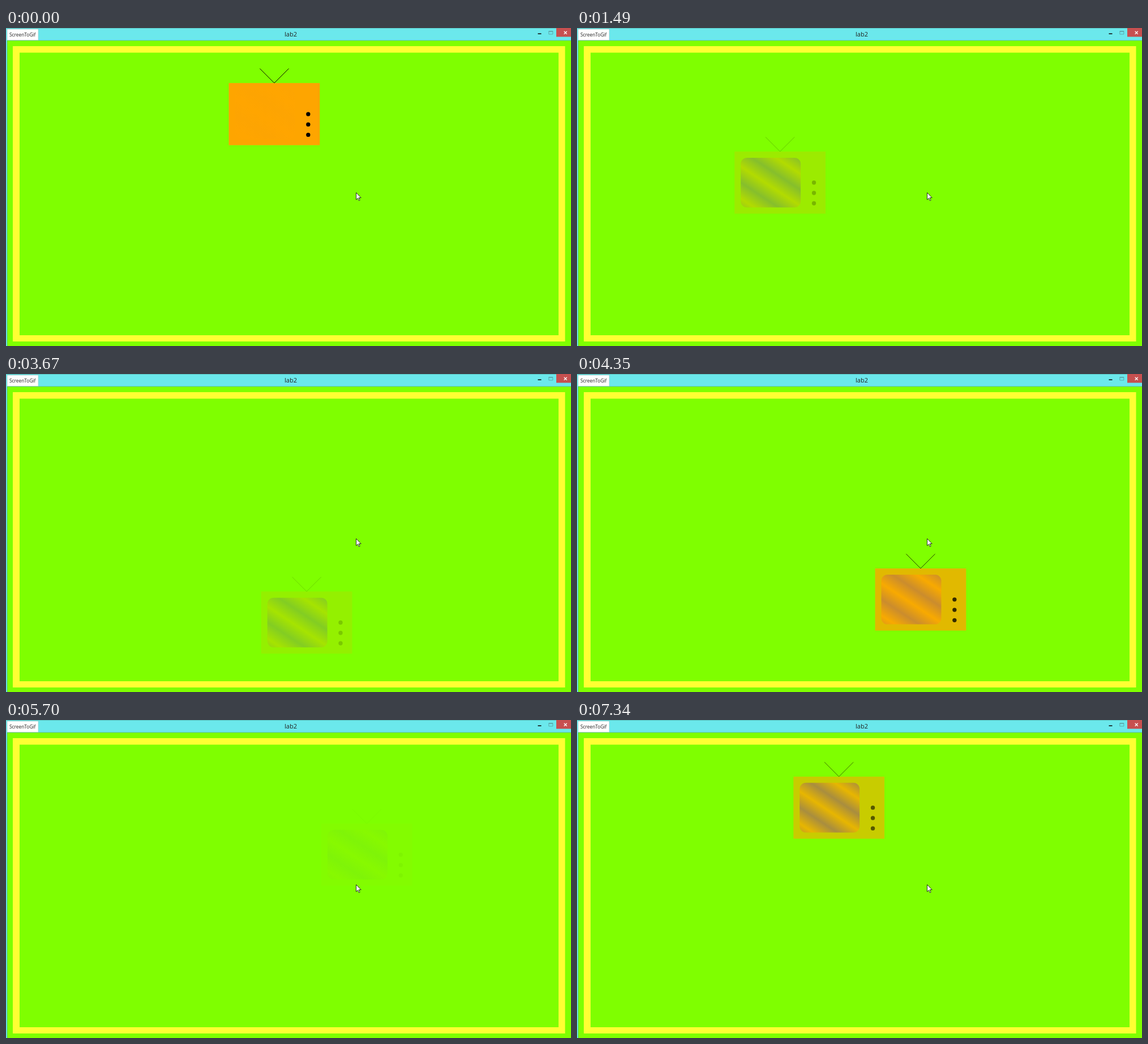
An HTML page that plays this animation: 998x561 px, repeating every 7.41 s.

```html
<!DOCTYPE html>
<html>
<head>
<meta charset="utf-8">
<style>
  html, body { margin: 0; width: 100%; height: 100%; overflow: hidden; background: #7fff00; }
  svg { display: block; }
  text { font-family: "Open Sans", "Noto Sans", sans-serif; text-anchor: middle; fill: #222; }
  #tv > * { opacity: var(--a); }
</style>
</head>
<body>
<svg width="998" height="561" viewBox="0 0 998 561">
  <defs>
    <linearGradient id="stripes" gradientUnits="userSpaceOnUse" spreadMethod="reflect"
                    x1="-95" y1="-2.8" x2="-112.8" y2="24.1">
      <stop id="dark" offset="0"/>
      <stop offset="1" stop-color="orange"/>
    </linearGradient>
  </defs>

  <!-- window -->
  <rect width="998" height="561" fill="#6be8ec"/>
  <rect x="2" y="22" width="996" height="539" fill="#7fff00"/>
  <path d="M0 .4H998M2 22H998M2 22V561" stroke="#4fa9a0" stroke-width=".7" fill="none"/>
  <path d="M12 32H987.5V553H12ZM24 43.5V542H976V43.5Z" fill="#ffff33"/>
  <rect x="2" y="2" width="55" height="19.5" fill="#fff" stroke="#a5c8ca" stroke-width=".7"/>
  <text x="29.2" y="15.2" font-size="8.4">ScreenToGif</text>
  <text x="503" y="15.3" font-size="11">lab2</text>
  <path d="M939.5 10.2H945.5" stroke="#111" stroke-width="1.6"/>
  <path d="M958.8 5.5H965.8V11H958.8ZM958.8 6.3H965.8" fill="none" stroke="#5a9a9c" stroke-width=".8"/>
  <rect x="972" width="26" height="15.5" fill="#c75050"/>
  <path d="M985.7 5.7l5 5m0-5l-5 5" stroke="#fff" stroke-width="1.3"/>

  <g id="tv">
    <path d="M-35-35L0 0L35-35" fill="none" stroke="#000" stroke-width="1.3"/>
    <rect x="-110" width="220" height="150" fill="orange"/>
    <rect x="-95" y="15" width="145" height="120" rx="15" fill="url(#stripes)"/>
    <circle cx="82" cy="75" r="5"/>
    <circle cx="82" cy="100" r="5"/>
    <circle cx="82" cy="125" r="5"/>
  </g>

  <path d="M618.5 290.5v12.4l2.9-2.7 1.9 4.3 1.8-.8-1.9-4.2h3.9z" fill="#fff" stroke="#000" stroke-width=".8"/>
</svg>
<script>
const LOOP = 7410, FIRST = 107;
const CENTER = [503, 240.3], RADIUS = 146.1, SCALE = 0.7306;
const FADE = 1123.5, FADE_ZERO = 1238;

// The picture advances in steps: [start, number of equal steps until the next start]
const RUNS = [
  [0, 1], [180, 8], [930, 6], [1490, 1], [1570, 2], [1730, 9], [2510, 1], [2600, 1],
  [2680, 8], [3330, 3], [3580, 1], [3670, 1], [3750, 8], [4350, 10], [5080, 1],
  [5150, 11], [5900, 7], [6380, 1], [6450, 3], [6650, 10], [7340, 1], [LOOP, 1]
];
const tv = document.getElementById("tv");
const dark = document.getElementById("dark");

function snap(t) {
  const i = RUNS.findIndex(run => run[0] > t) - 1;
  const [start, count] = RUNS[i];
  const step = (RUNS[i + 1][0] - start) / count;
  return Math.max(FIRST, start + Math.floor((t - start) / step) * step);
}

// Linear fade back and forth, 0 at FADE_ZERO
function fade(t) {
  const phase = Math.abs(t - FADE_ZERO) / FADE % 2;
  return phase > 1 ? 2 - phase : phase;
}

function draw(now) {
  const t = snap(now % LOOP);
  const angle = (6.1 + 0.0504 * t) * Math.PI / 180;
  const x = CENTER[0] - RADIUS * Math.sin(angle);
  const y = CENTER[1] - RADIUS * Math.cos(angle);
  const a = fade(t);
  tv.setAttribute("transform", `translate(${x} ${y}) scale(${SCALE})`);
  tv.style.setProperty("--a", a);
  dark.setAttribute("stop-color", `rgb(${[255 * a, 165 * a, 255 * (1 - a)].map(Math.round)})`);
}

function tick() {
  draw(performance.now());
  requestAnimationFrame(tick);
}
tick();
</script>
</body>
</html>
```
